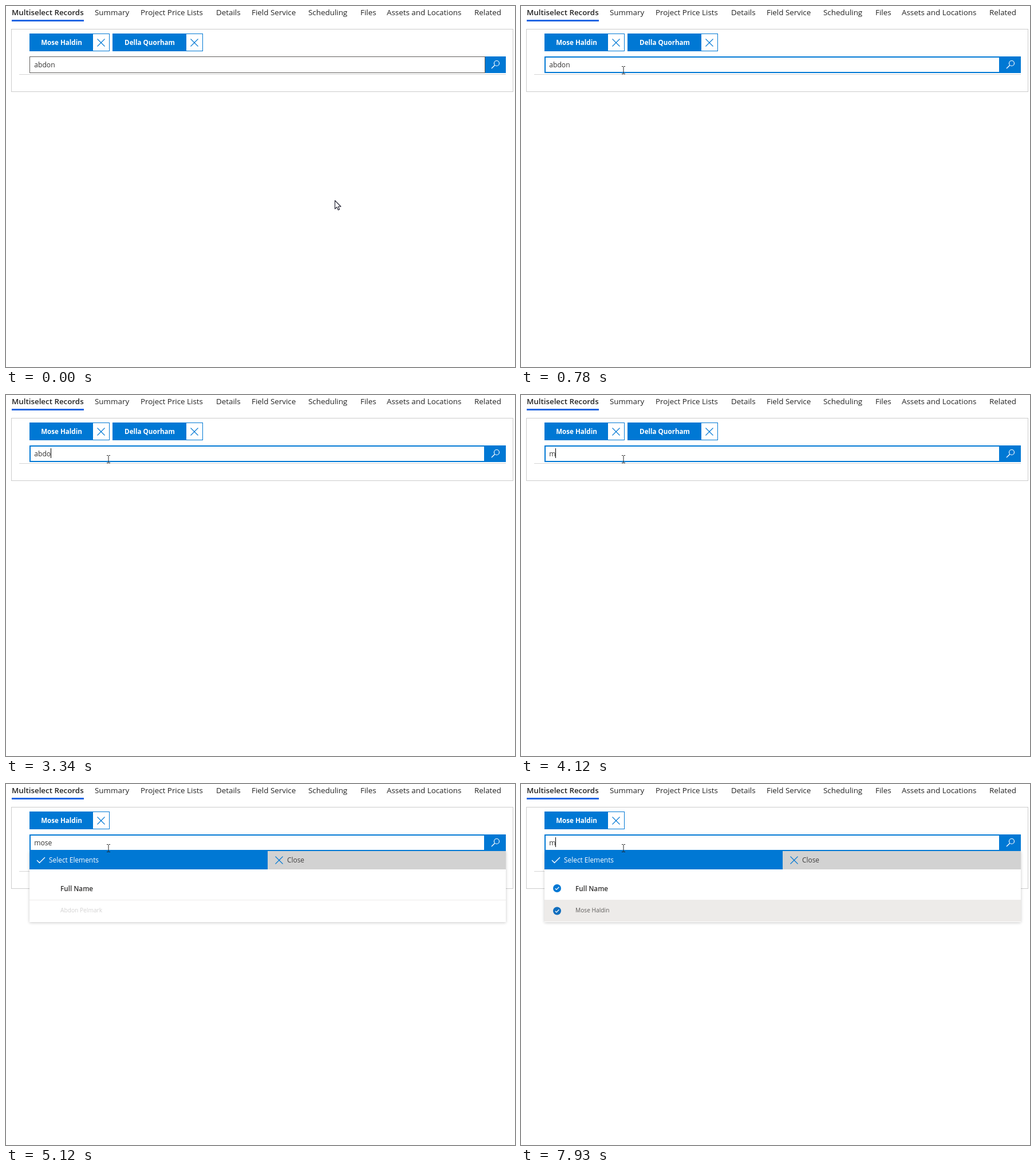
An HTML page with a canvas for the animation above (8 s loop, 889x630 px).

```html
<!DOCTYPE html>
<html lang="en">
<head>
<meta charset="utf-8">
<title>Multiselect Records</title>
<style>
  html, body { margin: 0; width: 100%; height: 100%; overflow: hidden; background: #fff; }
  canvas { display: block; width: 889px; height: 630px; }
</style>
</head>
<body>
<canvas id="stage"></canvas>
<script>
const W = 889, H = 630, LOOP = 8000;
const BLUE = '#0078d4', INK = '#242424';
const canvas = document.getElementById('stage');
const ctx = canvas.getContext('2d');
const dpr = window.devicePixelRatio || 1;
canvas.width = W * dpr;
canvas.height = H * dpr;

const font = (size, weight = 400) => `${weight} ${size}px "Open Sans", "Noto Sans", sans-serif`;
const INPUT_FONT = font(12.1);

const TABS = [
  ['Summary', 155], ['Project Price Lists', 235], ['Details', 367], ['Field Service', 429],
  ['Scheduling', 528], ['Files', 619], ['Assets and Locations', 665], ['Related', 818]
];

// [start, typed text, caret shown]
const TYPING = [
  [0, 'abdon', 0], [870, 'abdon', 1], [1400, 'abdon', 0], [1950, 'abdon', 1],
  [2410, 'abdon', 0], [2960, 'abdon', 1], [3340, 'abdo', 1], [3510, 'abd', 1],
  [3590, 'ab', 0], [3740, 'a', 0], [3890, '', 0], [3970, '', 1],
  [4120, 'm', 1], [4200, 'mo', 1], [4280, 'mos', 1], [4430, 'mose', 1],
  [4890, 'mose', 0], [5430, 'mose', 1], [5980, 'mose', 0], [6530, 'mose', 1],
  [7060, 'mose', 0], [7540, 'mose', 1], [7610, 'mos', 1], [7760, 'mo', 1], [7930, 'm', 1]
];

const MOVES = [70, 140, 200, 270, 340, 400];
const OPEN = 5120;

const at = (list, t) => list.filter(item => item[0] <= t).pop();
const smooth = p => p * p * (3 - 2 * p);
const mix = (a, b, p) => a + (b - a) * p;

function rect(x, y, w, h, color) {
  ctx.fillStyle = color;
  ctx.fillRect(x, y, w, h);
}

function frame(x, y, w, h, color, width = 1) {
  ctx.strokeStyle = color;
  ctx.lineWidth = width;
  ctx.strokeRect(x + width / 2, y + width / 2, w - width, h - width);
}

function text(str, x, y, style, color, align = 'left') {
  ctx.font = style;
  ctx.fillStyle = color;
  ctx.textAlign = align;
  ctx.fillText(str, x, y);
}

function line(points, color, width) {
  ctx.beginPath();
  points.forEach(([x, y]) => ctx.lineTo(x, y));
  ctx.strokeStyle = color;
  ctx.lineWidth = width;
  ctx.stroke();
}

function cross(x, y, r, color) {
  line([[x - r, y - r], [x + r, y + r]], color, 1.1);
  line([[x + r, y - r], [x - r, y + r]], color, 1.1);
}

function tabs() {
  text('Multiselect Records', 10, 16, font(13.35, 600), INK);
  rect(10, 24, 126, 3, '#2266e3');
  TABS.forEach(([name, x]) => text(name, x, 16, font(13.4), INK));
}

function chip(name, x, w, hover) {
  const split = x + w - 30;
  rect(x, 48, w, 31, BLUE);
  rect(split + 1, 49, 28, 29, hover ? '#f3f2f1' : '#fff');
  text(name, (x + split) / 2 + 1, 68, font(11.6, 700), '#fff', 'center');
  cross(split + 15, 64, 6.5, hover ? '#42526b' : BLUE);
}

function searchButton() {
  rect(837, 88, 36, 29, BLUE);
  ctx.beginPath();
  ctx.arc(857, 100, 4.5, 0, 7);
  ctx.strokeStyle = '#fff';
  ctx.lineWidth = 1.2;
  ctx.stroke();
  line([[853.8, 103.2], [848, 109]], '#fff', 1.3);
}

function input(t) {
  const [, typed, caret] = at(TYPING, t);
  const focused = t >= 780;
  rect(41, 88, 796, 29, '#fff');
  frame(41, 88, 796, 29, focused ? BLUE : t >= 470 ? '#323130' : '#605e5c', focused ? 2 : 1);
  text(typed || 'Search...', 49.3, 107, INPUT_FONT, typed ? '#323130' : '#605e5c');
  if (caret) rect(Math.round(49 + (typed && ctx.measureText(typed).width)), 93, 1, 17, '#000');
  searchButton();
}

function badge(y, color) {
  ctx.beginPath();
  ctx.arc(63, y, 7, 0, 7);
  ctx.fillStyle = color;
  ctx.fill();
  line([[59.8, y + 0.2], [62, y + 2.4], [66.4, y - 2.2]], '#fff', 1.3);
}

function panel(t) {
  ctx.save();
  ctx.shadowColor = 'rgba(0,0,0,.22)';
  ctx.shadowBlur = 5 * dpr;
  ctx.shadowOffsetY = dpr;
  rect(41, 117, 832, 124, '#fff');
  ctx.restore();

  rect(41, 117, 416, 32, BLUE);
  rect(457, 117, 416, 32, '#d2d2d2');
  line([[54, 133], [58.5, 137.5], [68, 128]], '#fff', 1.4);
  text('Select Elements', 75, 137, font(11.9), '#fff');
  cross(477, 133, 6.5, BLUE);
  text('Close', 491, 137, font(11.9), '#424040');
  text('Full Name', 95, 187, font(11.7, 600), '#323130');
  rect(41, 202, 832, 1, '#edebe9');

  const loaded = t >= 5200;
  if (loaded) {
    rect(41, 203, 832, 37, '#edebe9');
    badge(182, BLUE);
    badge(221.5, '#106ebe');
  }
  ctx.globalAlpha = loaded ? Math.min(1, 0.4 + Math.floor((t - 5200) / 77) * 0.2) : 0.28;
  text(loaded ? 'Mose Haldin' : 'Abdon Pelmark', 95, 224, font(10.2), '#605e5c');
  ctx.globalAlpha = 1;
}

function pointer(t) {
  if (t >= 780) return [179, 112];
  if (t >= 550) return [179, 115];
  if (t >= 470) return [179, 106];
  const p = smooth(MOVES.filter(m => m <= t).length / MOVES.length);
  return [mix(574.5, 179, p), mix(339, 78, p)];
}

const ARROW = new Path2D('M0 .5V15L3.4 11.9 5.7 17 8 16 5.8 11H10.4Z');
const HAND = new Path2D('M0 .8C0-.6 2.8-.6 2.8.8V7C3-.1 5.6 5.4 5.8 7.6 6.3 6.1 8.4 6.3 8.5 8.2 9.2 7.2 11 7.7 11 9.3V13.5C11 16.5 9 17.5 9 20H1.2C1 17.5-1.8 15.2-4.2 12-5.2 10.4-3.2 9.2-2 10.3L0 12Z');

function cursor(t) {
  const [x, y] = pointer(t);
  const overInput = y >= 88 && y < 117 && x > 41 && x < 837;
  if (overInput) {
    line([[x, y - 6], [x, y + 7]], '#222', 1);
    [-6.5, 6.5].forEach(d => {
      line([[x - 3, y + d], [x - 0.7, y + d]], '#222', 1);
      line([[x + 0.7, y + d], [x + 3, y + d]], '#222', 1);
    });
    return;
  }
  const shape = y < 79 ? HAND : ARROW;
  ctx.save();
  ctx.translate(x, y);
  ctx.lineJoin = 'round';
  ctx.lineWidth = 1.1;
  ctx.fillStyle = '#fff';
  ctx.strokeStyle = '#1b1b2b';
  ctx.fill(shape);
  ctx.stroke(shape);
  ctx.restore();
}

function draw(t) {
  const open = t >= OPEN;
  const drop = open ? 33 : 0;
  ctx.setTransform(dpr, 0, 0, dpr, 0, 0);
  rect(0, 0, W, H, '#fff');
  tabs();
  frame(9, 40, 877, 110 + drop, '#cccccc');
  rect(23, 119 + drop, 850, 1, '#d6d6d6');
  chip('Mose Haldin', 41, 140, t >= 400 && t < 470);
  if (!open) chip('Della Quorham', 186, 158, false);
  if (open) panel(t);
  input(t);
  cursor(t);
}

const start = performance.now();
function tick() {
  draw((performance.now() - start) % LOOP);
  requestAnimationFrame(tick);
}
tick();
</script>
</body>
</html>
```
